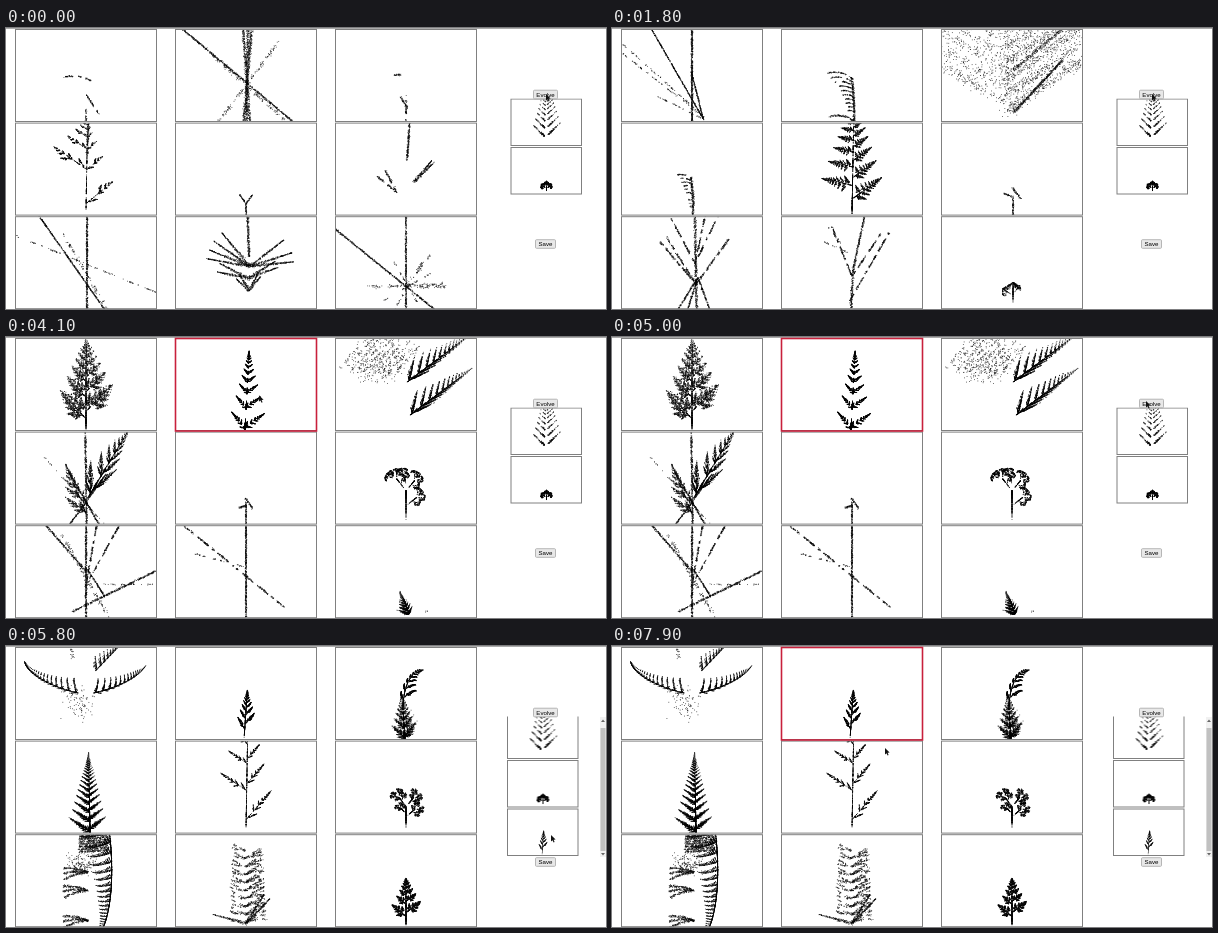
Recreate the animation shown at these times as an HTML page with a canvas. Size 600x281 px, loop 8 s.

```html
<!DOCTYPE html>
<html lang="en">
<head>
<meta charset="utf-8">
<title>Evolving plants</title>
<style>
html, body { margin: 0; width: 100%; height: 100%; overflow: hidden; background: #fff; }
canvas { display: block; }
</style>
</head>
<body>
<canvas id="stage" width="600" height="281"></canvas>
<script>
const W = 600, H = 281, LOOP = 8000;
const stage = document.getElementById('stage').getContext('2d');
const panelX = i => 9.5 + i % 3 * 160;
const panelY = i => 1.5 + Math.floor(i / 3) * 93.6;
let pen, seed = 1;

const rnd = () => (seed = seed * 16807 % 2147483647) / 2147483647;
const gauss = () => rnd() + rnd() + rnd() - 1.5;
const rad = degrees => degrees * Math.PI / 180;
const repeat = (n, draw) => { for (let i = 0; i < n; i++) draw(i / n); };
const fanOut = (from, to, n) => Array.from({ length: n }, (_, i) => from + (to - from) * i / (n - 1));

// Plants stand at (0, 0), the middle of the panel's ground; y is the height, angle 0 points up.
const dot = (x, y) => pen.fillRect(x - .4, -y - .4, .8, .8);

// Iterated function system: the plant is its stem, a smaller copy of itself on top, and its shoots,
// which are copies too. Each shoot is [angle, size, height on the stem].
function grow(x, y, angle, h, { keep = .8, turn = 0, stem = .3, thin = 1, n = 2500, shoots }) {
  const maps = shoots.map(([a, size, at]) => ({ a: rad(a), size, at, thin, weight: size ** 1.6 }));
  if (keep) maps.push({ a: rad(turn), size: keep, at: 1 - keep, thin: 1, weight: keep ** 1.6 });
  if (stem) maps.push({ a: 0, size: stem, at: 0, thin: 0, weight: stem * .25 });
  const total = maps.reduce((sum, m) => sum + m.weight, 0);
  const cos = Math.cos(rad(angle)) * h, sin = Math.sin(rad(angle)) * h;
  let u = 0, v = 0;
  for (let i = -20; i < n; i++) {
    let pick = rnd() * total;
    const m = maps.find(m => (pick -= m.weight) <= 0) || maps[0];
    const c = Math.cos(m.a) * m.size, s = Math.sin(m.a) * m.size, side = u * m.thin;
    [u, v] = [side * c + v * s, v * c - side * s + m.at];
    if (i >= 0) dot(x + u * cos + v * sin, y + v * cos - u * sin);
  }
}

// Speckled stroke: w = fuzziness, d = dots per pixel, gap = how broken it is (-2 solid, 2 empty)
function bar(x, y, angle, len, { w = .7, d = 4, gap = -2, bend = 0, taper = 0 } = {}) {
  const phase = rnd() * 9;
  for (let n = len * d; n > 0; n--) {
    const t = rnd(), s = t * len, a = rad(angle + bend * t / 2), fuzz = w * (1 - taper * t);
    if (Math.sin(s * .7 + phase) + Math.sin(s * .29 + phase * 2) < gap) continue;
    dot(x + Math.sin(a) * s + gauss() * fuzz, y + Math.cos(a) * s + gauss() * fuzz);
  }
}

const rays = (x, y, len, angles, o) => angles.forEach(a => bar(x, y, a, len, o));
const cross = (x, y, len, angles, o) => rays(x, y, len, angles.flatMap(a => [a, a + 180]), o);

function cloud(x, y, rx, ry, n) {
  repeat(n, () => dot(x + gauss() * rx, y + gauss() * ry));
}

const BROKEN = { w: .8, gap: -.4 }, DOTTED = { w: .7, d: 1.4, gap: 0 };
const SPIKE = { w: 1.8, d: 4, taper: .8 }, SOFT = { w: 1.8, d: 1.8, gap: -.7 };

// Broken stem with a loose twig and an arc floating above it
function wisp(stem, arcX, arcY, arcLen) {
  bar(0, 0, 0, stem, BROKEN);
  bar(arcX, arcY, 75, arcLen, { ...BROKEN, bend: 45 });
}

// Curved stem with arcs trailing to the left
function plume(x, h, len) {
  bar(x, 0, 2, h, { w: 1.2, d: 5, bend: -10 });
  repeat(10, t => bar(x + 1 - t * 3, h * (.2 + t * .85), -48, len * (.25 + .75 * t * t), { w: .6, d: 3, gap: -.8, bend: -60 }));
}

// Fans of soft leaves, stacked in tiers
function tiers(n, y, rise, left, right) {
  repeat(n, t => {
    const base = y + t * n * rise;
    rays(-3, base, left, fanOut(-100, -35, 7), { w: 1.1, d: 2.4, gap: -.5, bend: 35 });
    right(base);
  });
}

const tree = (h, shoots) => grow(0, 0, 0, h, { keep: 0, stem: .6, n: 1800, shoots });
const BUSHY = [[-42, .42, .12], [44, .42, .2]];

const generations = [[
  () => { wisp(16, -22, 44, 27); bar(0, 27, 147, 24, BROKEN); },
  () => { cross(1, 38, 75, [1, -4, 5], { w: 1.5 }); cross(1, 38, 110, [-50], { w: .9 }); cross(0, 36, 55, [37, -48], SOFT); },
  () => { wisp(26, -12, 46, 12); bar(-6, 25, 147, 17, BROKEN); },
  () => { bar(1, 60, 3, 33, { w: 1.2 }); grow(0, 4, 1, 92, { keep: .6, stem: .4, thin: .4, n: 1300, shoots: [[-56, .44, .45], [50, .38, .08]] }); },
  () => { rays(0, 11, 11, [180, -35, 35]); },
  () => { bar(1, 55, 4, 37, { w: 1, d: 5 }); rays(8, 33, 28, [40, 46], SPIKE); rays(-9, 22, 26, [-50, -28], { w: 1, gap: -.5 }); },
  () => { cross(1, 24, 90, [0], { w: .9, d: 5 }); cross(1, 24, 90, [-35], { w: .6 }); cross(1, 44, 76, [-68], DOTTED); cross(3, 30, 50, [-30], SOFT); },
  () => {
    bar(3, 52, -2, 42, { w: 1.2, d: 5 });
    rays(4, 42, 44, [-80, -68, -55, -40, 52, 72, 84], SPIKE); rays(2, 30, 32, [-78, -62, 58, 70], SPIKE);
    rays(3, 18, 18, [-48, -30, 28, 40], SPIKE);
  },
  () => { cross(0, 22, 92, [0, -51], { w: .8 }); rays(0, 22, 40, [-90, 90, 37, 86], SOFT); cross(2, 22, 28, [30, -30, 60], DOTTED); }
], [
  () => { wisp(25, -22, 44, 27); bar(0, 27, 147, 22, BROKEN); rays(-17, 5, 28, [88, 96], BROKEN); },
  () => { wisp(41, -20, 55, 27); bar(0, 13, 150, 15, BROKEN); },
  () => { bar(1, 0, 0, 16, BROKEN); bar(1, 16, -78, 9); },
  () => { bar(0, 0, 0, 92, BROKEN); rays(8, 41, 43, [-73, -96], DOTTED); bar(0, 1, -50, 22, DOTTED); },
  () => {
    bar(-11, 32, 62, 84, { w: 1.8, d: 9, bend: 50 });
    repeat(9, t => bar(-11 + t * 20, 36 + t * 38, 68, 84 - t * 20, { ...SOFT, bend: 40, d: 3 }));
    repeat(7, t => bar(-11 + t * 8, 34 - t * 12, 70, 62 - t * 32, { ...SOFT, bend: 80, d: 3.5 }));
    cloud(-8, 60, 25, 24, 150); cloud(0, 34, 9, 5, 300);
  },
  () => {
    repeat(4, t => {
      const x = 2 - t * 9, y = 80 - t * 75;
      rays(x, y - 3, 25, fanOut(-108, -50, 6), { w: 1.2, d: 3.5, gap: -.5, bend: 60 });
      rays(x + 7, y - 10, 21, [58, 66], { w: 1, gap: -.4 });
    });
  },
  () => {
    bar(0, 0, -20, 51, { w: .6 }); bar(2, 20, -1, 74, { w: 1, d: 5 });
    rays(2, 32, 64, [-43, -8, 20, 50], SPIKE); rays(2, 32, 32, [-72, -60, 46, 62], SPIKE); rays(2, 18, 24, [25, 45, -30], SPIKE);
  },
  () => {
    bar(0, 15, 0, 78, { w: .8, d: 5 }); bar(-4, 47, -43, 64, { w: .7 }); rays(-4, 47, 80, [-57, -68], DOTTED);
    repeat(11, t => bar(1, 17 + t * 68, 38, 20, { ...DOTTED, gap: -.5 }));
  },
  () => {
    bar(0, 0, 0, 92, { w: 1.3, gap: -.7 });
    tiers(2, 22, 43, 27, y => repeat(6, t => bar(0, y - 4 + t * 24, 64, 62 - t * 14, { ...SOFT, bend: 62, d: 2.4 })));
  }
], [
  () => { cross(0, 46, 47, [0], { w: .9, d: 6 }); bar(12, 1, -30, 107, { w: .5 }); rays(12, 4, 110, [-48, -52], { ...DOTTED, gap: -.3 }); bar(12, 2, -64, 52, DOTTED); bar(11, 3, -14, 48, { w: .6 }); },
  () => { plume(2, 44, 30); bar(2, 0, -50, 25, { w: 1, bend: -60 }); },
  () => {
    repeat(6, t => { bar(-8, 88 - t * 95, 56, 95, { w: 6, d: 3 }); bar(2, 92 - t * 95, -58, 85, { w: 6, d: 1.8 }); });
    bar(2, 9, 43, 70, { w: 1.2, d: 6 }); bar(0, 50, 50, 80, { w: 2, d: 4 });
  },
  () => { plume(1, 38, 17); },
  () => { grow(0, 0, 1, 122, { keep: .8, stem: .22, n: 4800, shoots: [[-78, .26, .24], [53, .3, .13]] }); },
  () => { bar(1, 0, 0, 18); bar(1, 18, -70, 10, { w: 1 }); bar(9, 16, -38, 14, { w: 1 }); },
  () => {
    cross(4, 31, 64, [-1], { w: 1.2 }); rays(4, 24, 56, [-40, 36, -32], { w: 1, gap: -.8 }); rays(3, 45, 52, [-28, 26, 12], BROKEN);
    rays(6, 31, 48, [198, 160, 212], { w: .8 });
  },
  () => { bar(-1, 0, 3, 40, { w: 1.2 }); bar(1, 38, 12, 56, { w: 1 }); rays(0, 32, 54, [-22, 34], BROKEN); bar(-2, 8, 30, 78, BROKEN); rays(-4, 56, 32, [-66, -38], DOTTED); },
  () => { grow(1, 0, 0, 26, { keep: .55, stem: .7, n: 420, shoots: [[-58, .48, .5], [38, .42, .55]] }); bar(8, 18, -40, 10, { w: 1 }); }
], [
  () => { grow(0, 0, 0, 94, { keep: .74, n: 3800, shoots: BUSHY }); },
  () => { grow(-1, 0, 3, 80, { keep: .74, stem: .15, thin: .8, n: 3600, shoots: [[-42, .27, .02], [52, .3, .04]] }); },
  () => {
    repeat(10, t => bar(-66 + t * 55, 62 - t * 12, 42, 46, { ...SOFT, d: 1.2 }));
    for (const [x, y] of [[4, 15], [1, 48]]) grow(x, y, 53, 86, { keep: .86, stem: .3, thin: .6, n: 1700, shoots: [[-40, .32, .03], [12, .3, .05]] });
    cloud(-28, 66, 28, 18, 180);
  },
  () => {
    cross(0, 46, 46, [-1], { w: 1 }); cross(0, 20, 66, [-42], DOTTED); cross(0, 22, 34, [36, -30], { w: .8 });
    grow(2, 26, 31, 84, { keep: .74, n: 2200, thin: .7, shoots: [[-30, .42, .05], [18, .4, .1]] });
    grow(0, 10, -22, 54, { keep: .7, n: 800, shoots: [[-32, .45, .05], [20, .35, .1]] });
  },
  () => { bar(0, 0, 0, 23); bar(7, 15, -36, 13, { w: 1 }); bar(0, 18, -105, 7, { w: 1.1, d: 6 }); },
  () => { tree(60, [[-38, .46, .55], [40, .4, .55], [52, .4, .3], [-15, .3, .66]]); },
  () => {
    cross(0, 46, 47, [0], { w: 1, d: 5 }); bar(0, 46, -41, 60, { w: 1 }); rays(0, 32, 72, [29, 10], BROKEN);
    bar(-13, 6, 64, 92, { w: 1 }); bar(0, 33, 90, 70, DOTTED); bar(0, 50, 147, 34, { w: .8 }); cross(0, 40, 48, [-30], SOFT);
  },
  () => { bar(0, 0, 0, 93, { w: .7, d: 5 }); cross(-12, 51, 64, [-51], BROKEN); bar(0, 50, -75, 58, DOTTED); },
  () => { grow(3, 4, -22, 26, { keep: .84, stem: .4, n: 1100, thin: .5, shoots: [[-52, .55, 0], [46, .34, 0]] }); cloud(20, 6, 2, 1, 4); }
], [
  () => {
    for (const s of [-1, 1]) grow(s * 7, 46, s * 76, 68, { keep: .88, turn: -s * 2.6, thin: .6, n: 800, shoots: [[-s * 58, .24, .04], [s * 30, .1, .05]] });
    grow(9, 68, 44, 48, { keep: .86, n: 420, shoots: [[-50, .3, .05]] });
    bar(-13, 80, -10, 12, SOFT); cloud(-8, 36, 15, 18, 90);
  },
  () => { grow(-2, 0, 4, 50, { keep: .74, stem: .35, thin: .7, n: 1300, shoots: [[-34, .28, .2], [36, .3, .3]] }); },
  () => {
    grow(-1, 0, -4, 46, { keep: .78, n: 1900, shoots: [[-42, .42, .03], [42, .44, .06]] });
    grow(-3, 28, 2, 52, { keep: .76, turn: 9, n: 1100, thin: .6, shoots: [[-28, .22, .2], [44, .34, .25]] });
  },
  () => { grow(4, 0, -1, 82, { keep: .87, stem: .2, thin: .7, n: 4000, shoots: [[-56, .31, .02], [54, .25, .05]] }); },
  () => { grow(0, 4, 1, 132, { keep: .71, stem: .3, thin: .6, n: 1900, shoots: [[-57, .24, .29], [40, .29, .07]] }); },
  () => { tree(50, [[-36, .45, .52], [40, .45, .52], [50, .45, .32], [-42, .3, .38]]); },
  () => {
    grow(23, 98, 174, 118, { keep: .9, turn: 1.6, stem: .2, n: 2600, shoots: [[72, .26, .02]] });
    repeat(7, t => bar(23, 92 - t * 18, -94, 30, { w: 1.2, d: 4 }));
    for (const y of [58, 40, 10]) rays(2, y - 4, 25, [-94, -80, -68], { w: 1.2, d: 4, bend: -25 });
    cloud(-4, 62, 14, 9, 150);
  },
  () => {
    repeat(9, t => {
      rays(0, 4 + t * 72, 21 - t * 4, [48, 58, 70], { ...SOFT, w: 1.1, d: 2.6, bend: 20 });
      rays(0, 12 + t * 72, 17 - t * 4, [-92, -76], { ...SOFT, w: 1.1, d: 2.2, bend: 25 });
    });
    rays(0, 3, 34, [32, 44, -75], SPIKE);
  },
  () => { grow(0, 0, 0, 49, { keep: .68, stem: .38, n: 2300, shoots: [[-50, .38, .2], [52, .38, .28]] }); }
]];

function layer(draw) {
  const canvas = document.createElement('canvas');
  canvas.width = W; canvas.height = H;
  pen = canvas.getContext('2d');
  pen.fillStyle = 'rgba(0,0,0,.85)';
  draw();
  return canvas;
}

const sheets = generations.map((plants, g) => layer(() => plants.forEach((plant, i) => {
  seed = 7919 * (g * 9 + i + 1);
  pen.save();
  pen.beginPath();
  pen.rect(panelX(i), panelY(i), 141, 92);
  pen.clip();
  pen.translate(panelX(i) + 70.5, panelY(i) + 91.7);
  plant();
  pen.restore();
})));

const saved = layer(() => {
  pen.translate(540.5, 115);
  grow(0, 0, 0, 62, { keep: .85, stem: 0, thin: .25, n: 420, shoots: [[-46, .34, .08], [46, .34, .11]] });
  pen.translate(0, 51);
  grow(0, 0, 0, 13, { keep: 0, stem: .7, n: 420, shoots: [[-48, .55, .4], [46, .55, .4], [0, .4, .6]] });
});

// Cursor moves: start and end time, then where it stops
const MOVES = [
  [3200, 3900, 243, 58], [4000, 4900, 534, 64], [5300, 5500, 243, 60], [5500, 5700, 541, 212],
  [5700, 5800, 545, 189], [6000, 6400, 538, 193], [6900, 7000, 253, 78], [7500, 7900, 273, 102]
];

function cursorAt(t) {
  let x = 540, y = 66;
  for (const [start, end, toX, toY] of MOVES) {
    const f = Math.min(1, Math.max(0, (t - start) / (end - start))), ease = f * f * (3 - 2 * f);
    x += (toX - x) * ease;
    y += (toY - y) * ease;
  }
  return [x, y];
}

function box(x, y, w, h, color = '#808080', width = 1) {
  stage.strokeStyle = color;
  stage.lineWidth = width;
  stage.strokeRect(x, y, w, h);
}

function polygon(color, ...p) {
  stage.fillStyle = color;
  stage.beginPath();
  for (let i = 0; i < p.length; i += 2) stage.lineTo(p[i], p[i + 1]);
  stage.fill();
}

function button(label, x, y, w) {
  stage.beginPath();
  stage.roundRect(x, y, w, 8.6, 1);
  stage.fillStyle = '#e8e8e8';
  stage.fill();
  stage.strokeStyle = '#a6a6a6';
  stage.lineWidth = .8;
  stage.stroke();
  stage.fillStyle = '#000';
  stage.font = '6.1px "Liberation Sans", Arial, sans-serif';
  stage.textAlign = 'center';
  stage.fillText(label, x + w / 2, y + 6.4);
}

function savedList(scrolled) {
  const dx = scrolled ? -3.5 : 0, dy = scrolled ? -5 : 0;
  stage.save();
  stage.beginPath();
  stage.rect(495, 70.5, 105, 141);
  stage.clip();
  stage.drawImage(saved, dx, dy);
  for (let i = 0; i < (scrolled ? 3 : 2); i++) box(505 + dx, 71 + dy + i * 48.5, 70.5, 46.5);
  if (scrolled) {
    stage.drawImage(sheets[4], 170, 2, 140, 91, 502, 163.5, 70, 45.5);
    stage.fillStyle = '#f1f1f1';
    stage.fillRect(594, 71, 6, 140);
    stage.fillStyle = '#c1c1c1';
    stage.fillRect(594.5, 82, 5, 123);
    polygon('#666', 595, 76, 597, 73.5, 599, 76);
    polygon('#666', 595, 207, 597, 209.5, 599, 207);
  }
  stage.restore();
}

function draw(now) {
  const t = Math.floor(now % LOOP / 100) * 100;
  const generation = [400, 1800, 3100, 5300].filter(start => t >= start).length;
  const selected = t >= 3800 && t < 5300 || t >= 5500 && t < 5700 || t >= 7500;
  stage.fillStyle = '#fff';
  stage.fillRect(0, 0, W, H);
  stage.fillStyle = '#aaa';
  stage.fillRect(0, 0, W, 1);
  stage.drawImage(sheets[generation], 0, 0);
  for (let i = 0; i < 9; i++) box(panelX(i), panelY(i), 141, 92);
  if (selected) box(panelX(1), panelY(1), 141, 92.5, '#c8203c', 1.6);
  savedList(t >= 5700);
  button('Evolve', 527.5, 62.2, 24);
  button('Save', 529.5, 211.7, 20);
  const [x, y] = cursorAt(t);
  polygon('#111', x, y, x, y + 6.5, x + 1.5, y + 5.2, x + 2.6, y + 7.6, x + 3.6, y + 7.1, x + 2.6, y + 4.8, x + 4.6, y + 4.6);
  requestAnimationFrame(() => draw(performance.now()));
}
draw(0);
</script>
</body>
</html>
```
